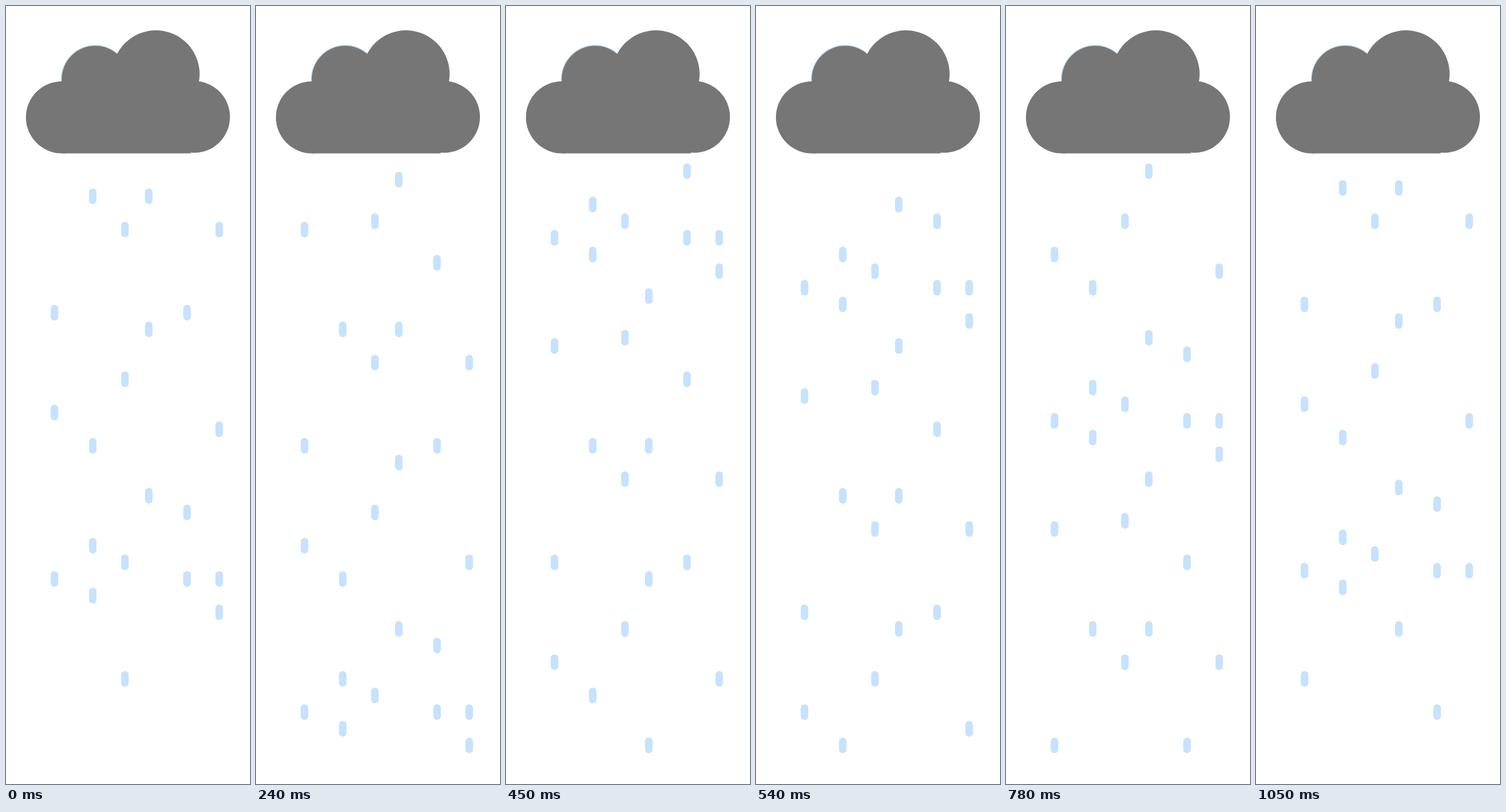
Recreate the animation shown at these times as an HTML page. Size 402 px wide and 1280 px high, loop 1.08 s.

```html
<!DOCTYPE html>
<html lang="en">
<head>
<meta charset="utf-8">
<title>Rain cloud</title>
<style>
  html, body { margin: 0; width: 100%; height: 100%; overflow: hidden; background: #fff; }
  svg { display: block; width: 100%; height: 100%; }
  .cloud { fill: #767676; }
  .rim { fill: #b4d2ec; }
  .rain { fill: #c6e2fc; }
</style>
</head>
<body>
<svg viewBox="0 0 402 1280">
  <circle class="rim" cx="146.8" cy="120.3" r="56"/>
  <g class="cloud">
    <circle cx="147" cy="120.8" r="55.2"/>
    <circle cx="247" cy="112" r="72"/>
    <circle cx="92" cy="183.2" r="59.2"/>
    <circle cx="310" cy="182.5" r="59"/>
    <path d="M92 124H310V180L304 242.4H92Z"/>
  </g>
  <g class="rain" id="rain"></g>
</svg>
<script>
  const LOOP = 1080, STEP = 30;
  const TOP = 259.1, ROW = 13.69, LAST = 69, CYCLE = 71;
  const W = 12.4, H = 25.6;

  // Start rows of the four drops in each column; negative rows enter later
  const columns = [
    [17, 29, 49, -9], [3, 33, 45, 51], [7, 25, 47, 61],
    [3, 19, 39, -15], [17, 41, 49, -5], [7, 31, 49, 53]
  ];

  // Three columns under each half of the cloud, with the gaps narrowing
  const columnX = c => {
    const i = c % 3;
    return 79.9 + 68 * i - 5 * i * i + (c < 3 ? 0 : 155.4);
  };

  const rain = document.getElementById('rain');
  function makeDrop(x, start) {
    const node = document.createElementNS('http://www.w3.org/2000/svg', 'rect');
    const attrs = { x: x - W / 2, width: W, height: H, rx: 5.8 };
    for (const k in attrs) node.setAttribute(k, attrs[k]);
    rain.appendChild(node);
    return { node, start };
  }
  const drops = columns.flatMap((starts, c) => starts.map(s => makeDrop(columnX(c), s)));

  // Every drop falls two rows per step and wraps to the top;
  // the lowest starters fade out early on their second fall
  function draw(ms) {
    const n = Math.floor((ms % LOOP) / STEP);
    for (const { node, start } of drops) {
      const fall = start + 2 * n;
      const row = fall % CYCLE;
      const last = fall >= CYCLE && start > 52 ? 47 : LAST;
      node.setAttribute('visibility', row >= 0 && row <= last ? 'visible' : 'hidden');
      node.setAttribute('y', TOP + ROW * row);
    }
  }

  function tick() {
    draw(performance.now());
    requestAnimationFrame(tick);
  }
  draw(0);
  requestAnimationFrame(tick);
</script>
</body>
</html>
```
